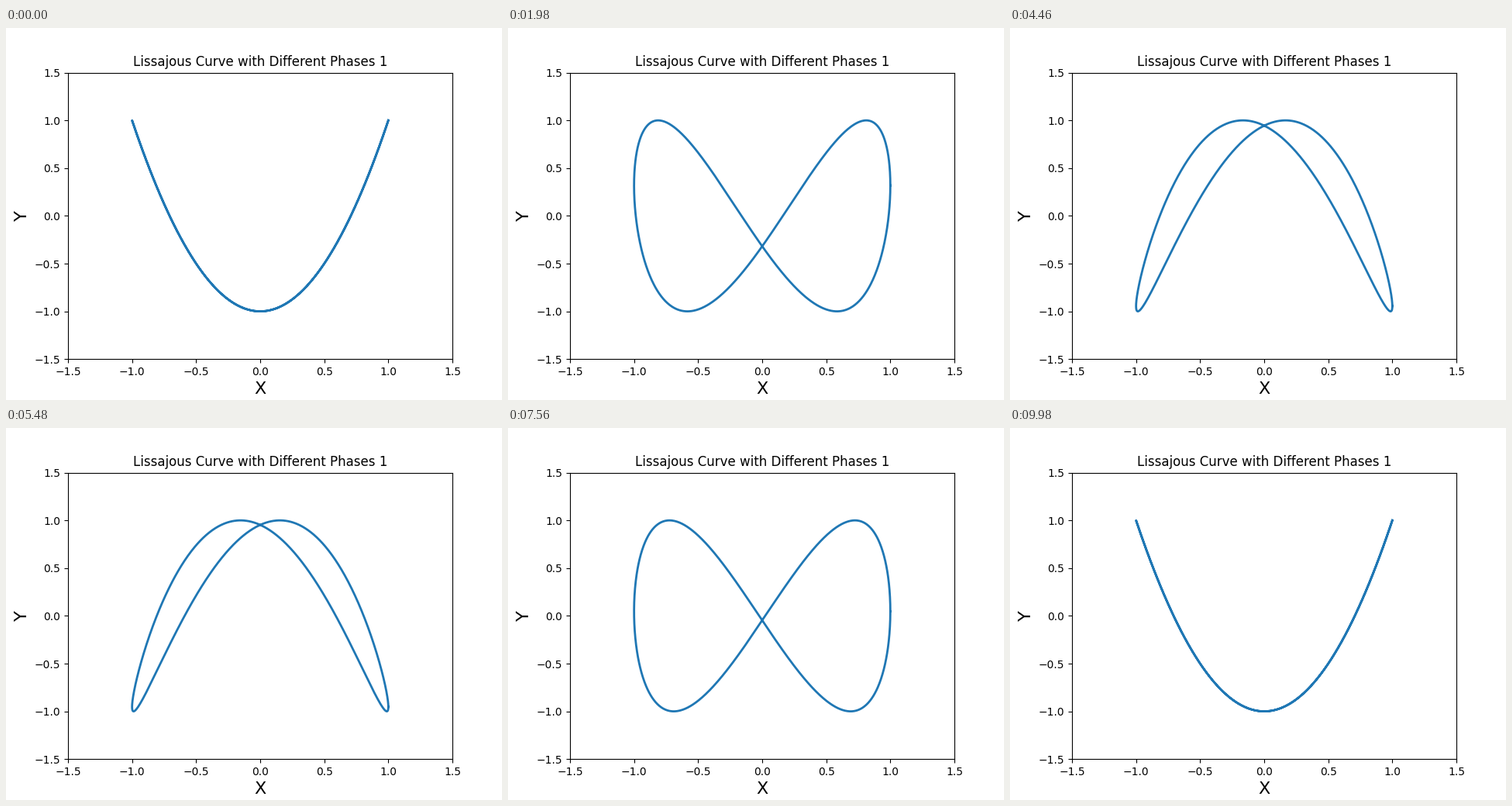
Animation of 640 by 480 pixels, one loop 10 s. Source, as a matplotlib script:

```python
import numpy as np
import matplotlib.pyplot as plt
from matplotlib.animation import FuncAnimation

FRAMES = 500
INTERVAL = 20  # ms

t = np.linspace(0, 2 * np.pi, 1000)
phases = np.linspace(0, 2 * np.pi, FRAMES)

fig, ax = plt.subplots(figsize=(6.4, 4.8), dpi=100)
ax.set_xlim(-1.5, 1.5)
ax.set_ylim(-1.5, 1.5)
ax.set_xlabel("X", fontsize=16)
ax.set_ylabel("Y", fontsize=16)
ax.set_title("Lissajous Curve with Different Phases 1")
curve, = ax.plot([], [], lw=2)


def update(frame):
    curve.set_data(np.cos(t), np.cos(2 * t + phases[frame]))
    return curve,


def init():
    return update(0)


anim = FuncAnimation(fig, update, frames=FRAMES, init_func=init,
                     interval=INTERVAL, repeat=True, repeat_delay=0, blit=True)
plt.show()
```
